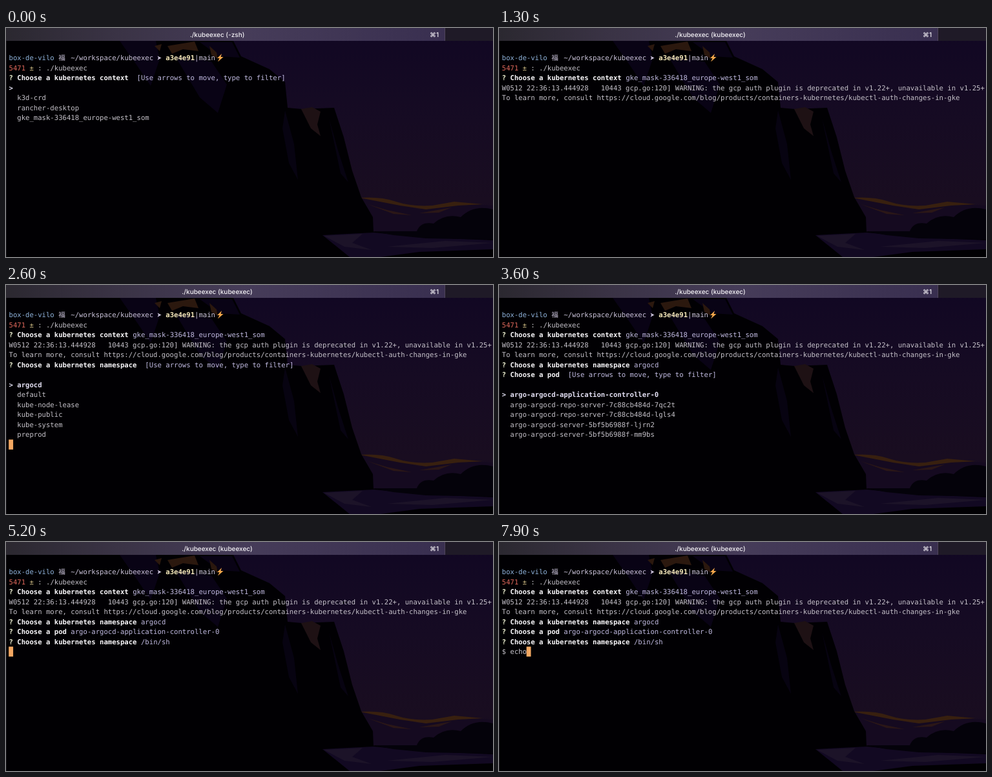
An HTML page for the animation above (8 s loop, 754 by 356 pixels).

```html
<!DOCTYPE html>
<html lang="en">
<head>
<meta charset="utf-8">
<title>kubeexec terminal</title>
<style>
  html, body { margin: 0; width: 100%; height: 100%; overflow: hidden; background: #000; }
  svg { display: block; width: 754px; height: 356px; }
  text { white-space: pre; text-rendering: geometricPrecision; }
  #screen { font: 10.615px "DejaVu Sans Mono", "Liberation Mono", monospace; }
  .title { font: 500 10px Inter, Roboto, sans-serif; fill: #f6f4f8; }
  .plain { fill: #c6c2ca; }
  .path { fill: #cdc5dc; }
  .host { fill: #91b4dd; }
  .red { fill: #e0685c; }
  .yellow { fill: #ddc88c; }
  .commit { fill: #f8ebbc; font-weight: bold; }
  .mark { fill: #f1f3d4; font-weight: bold; }
  .bold { fill: #fbf9fc; font-weight: bold; }
  .soft { fill: #c2bbe2; }
  .picked { fill: #e4e0f4; font-weight: bold; }
  .cjk { font-family: "Noto Sans CJK SC", "Noto Sans CJK JP", "Noto Sans CJK", sans-serif; }
</style>
</head>
<body>
<svg viewBox="0 0 754 356" xmlns="http://www.w3.org/2000/svg">
  <defs>
    <linearGradient id="sky" x2="0" y2="1">
      <stop offset="0" stop-color="#110723"/>
      <stop offset=".4" stop-color="#160b23"/>
      <stop offset=".75" stop-color="#190d20"/>
      <stop offset="1" stop-color="#160b24"/>
    </linearGradient>
    <linearGradient id="bar">
      <stop offset="0" stop-color="#2b2830"/>
      <stop offset=".25" stop-color="#3a3345"/>
      <stop offset=".55" stop-color="#463c59"/>
      <stop offset="1" stop-color="#392f50"/>
    </linearGradient>
  </defs>

  <rect width="754" height="356" fill="url(#sky)"/>
  <path d="M548 264L600 271L640 282L690 272L754 276V325H560Z" fill="#150a20"/>
  <path d="M548 264Q580 262 604 270T660 276L694 270L738 274L700 276L650 282L610 276Z" fill="#38200f"/>
  <path d="M560 274L590 283L628 291L600 289ZM640 288L690 279L670 287Z" fill="#2b1717"/>
  <path d="M636 316Q642 300 662 304Q680 288 704 294Q724 274 754 282V326H636Z" fill="#04020a"/>

  <path d="M0 20H352L364 44L408 64L432 84L436 124L458 126L508 124L523 170L536 222L550 263L568 294L569 318H0Z" fill="#010003"/>
  <path d="M176 20H232L238 48L224 90L204 60ZM262 44L318 52L342 88L328 132L300 108ZM300 22H350L362 46L330 44Z" fill="#090315"/>
  <path d="M432 128L446 180L452 236L438 210L428 156ZM500 140L514 190L530 240L518 226Z" fill="#070311"/>
  <path d="M230 28L241 25L238 36ZM250 28L292 21L298 36L274 33L257 40ZM315 28L326 38L328 48L318 42Z" fill="#2b180e"/>
  <path d="M457 126L474 123L487 130L482 150L487 168L472 156Z" fill="#1e1114"/>

  <path d="M0 317H754V356H0Z" fill="#010003"/>
  <path d="M490 322L570 318L640 325L754 330V344L640 348L580 356H532Z" fill="#120922"/>
  <path d="M492 323L552 320L536 334L566 345L524 340ZM590 340L680 331L754 334L660 342Z" fill="#1c1328"/>
  <path d="M566 316H754V329L650 327L600 322Z" fill="#04020a"/>

  <rect width="754" height="20" fill="#1f1a27"/>
  <rect width="679" height="20" fill="url(#bar)"/>
  <path d="M679.5 0V20" stroke="#50465c"/>
  <path d="M.5 20V356" stroke="#17151b"/>
  <text id="title" class="title" x="327" y="14" text-anchor="middle"></text>
  <text class="title" x="656" y="14">⌘1</text>
  <rect id="cursor" width="6.9" height="15.5" fill="#f4a862"/>
  <g id="screen"></g>
  <path d="M234.5 43.5L240.5 46.6L234.5 49.7L236 46.6Z" fill="#cdc5dc"/>
  <path d="M334 40L327 47H330.5L328 52.5L336.5 45H332.5Z" fill="#f5a84c"/>
</svg>
<script>
const LOOP = 8000, CELL = 6.39, LEFT = 4.5, BASE = 50, LINE = 15.53;
const byId = id => document.getElementById(id);
const screen = byId("screen"), title = byId("title"), cursor = byId("cursor");

const contexts = ["", "k3d-crd", "rancher-desktop", "gke_mask-336418_europe-west1_som"];
const namespaces = ["", "argocd", "default", "kube-node-lease", "kube-public", "kube-system", "preprod"];
const pods = ["", "argo-argocd-application-controller-0", "argo-argocd-repo-server-7c88cb484d-7qc2t",
  "argo-argocd-repo-server-7c88cb484d-lgls4", "argo-argocd-server-5bf5b6988f-ljrn2",
  "argo-argocd-server-5bf5b6988f-mm9bs"];
const shells = ["/bin/sh", "/bin/bash"];

// A span is [class, text, column]; without a column it follows the previous span.
const header = [
  [["host", "box-de-vilo"], ["path cjk", "福", 12], ["path", "~/workspace/kubeexec", 15],
   ["commit", "a3e4e91", 38], ["path", "|main"]],
  [["red", "5471"], ["yellow", " ±"], ["plain", " : ./kubeexec"]]
];
const warning = [
  [["plain", "W0512 22:36:13.444928   10443 gcp.go:120] WARNING: the gcp auth plugin is deprecated in v1.22+, unavailable in v1.25+"]],
  [["plain", "To learn more, consult https://cloud.google.com/blog/products/containers-kubernetes/kubectl-auth-changes-in-gke"]]
];

// Each move is the time at which the next option becomes selected.
const prompts = [
  { label: "context", options: contexts, from: 0, moves: [800, 1000, 1100], done: 1300, after: warning },
  { label: "namespace", options: namespaces, from: 1400, moves: [2400], done: 2900 },
  { label: "pod", options: pods, from: 3000, moves: [3400], done: 3700 },
  { label: "namespace", options: shells, from: 3700, moves: [], done: 4500 }
];
const keys = [6900, 7200, 7500, 7700];
const passed = (times, t) => times.filter(at => t >= at).length;

function promptRows({ label, options, moves, done, after = [] }, t) {
  const question = label === "pod" ? "Choose a pod" : `Choose a kubernetes ${label}`;
  const head = [["mark", "? "], ["bold", question]];
  const selected = passed(moves, t);
  if (t >= done) return [[...head, ["soft", " " + options[selected]]], ...after];
  return [
    [...head, ["soft", "  [Use arrows to move, type to filter]"]],
    ...options.map((name, i) => i === selected ? [["picked", "> " + name]] : [["plain", "  " + name]])
  ];
}

function stateAt(t) {
  const rows = [...header];
  for (const prompt of prompts) if (t >= prompt.from) rows.push(...promptRows(prompt, t));
  let caret = null;
  if (t >= 2600 && t < 2700) caret = [0, rows.length];
  if (t >= 4500) caret = [0, rows.length];
  if (t >= 6500) {
    const line = "$ " + "echo".slice(0, passed(keys, t));
    caret = [line.length, rows.length];
    rows.push([["plain", line]]);
  }
  return { rows, caret, title: `./kubeexec (${t < 100 ? "-zsh" : "kubeexec"})` };
}

function rowMarkup(spans, row) {
  let column = 0;
  return spans.map(([style, text, start = column]) => {
    column = start + text.length;
    const x = LEFT + start * CELL, y = BASE + row * LINE;
    return `<text class="${style}" x="${x.toFixed(2)}" y="${y.toFixed(2)}">${text.replace(/>/g, "&gt;")}</text>`;
  }).join("");
}

let shown = "";
function render(t) {
  const state = stateAt(t);
  const markup = state.rows.map(rowMarkup).join("");
  if (markup !== shown) screen.innerHTML = shown = markup;
  if (title.textContent !== state.title) title.textContent = state.title;
  cursor.style.display = state.caret ? "" : "none";
  if (state.caret) {
    cursor.setAttribute("x", LEFT - 0.3 + state.caret[0] * CELL);
    cursor.setAttribute("y", BASE - 11.6 + state.caret[1] * LINE);
  }
}

let began;
function tick(now) {
  began ??= now;
  render((now - began) % LOOP);
  requestAnimationFrame(tick);
}
render(0);
requestAnimationFrame(tick);
</script>
</body>
</html>
```
